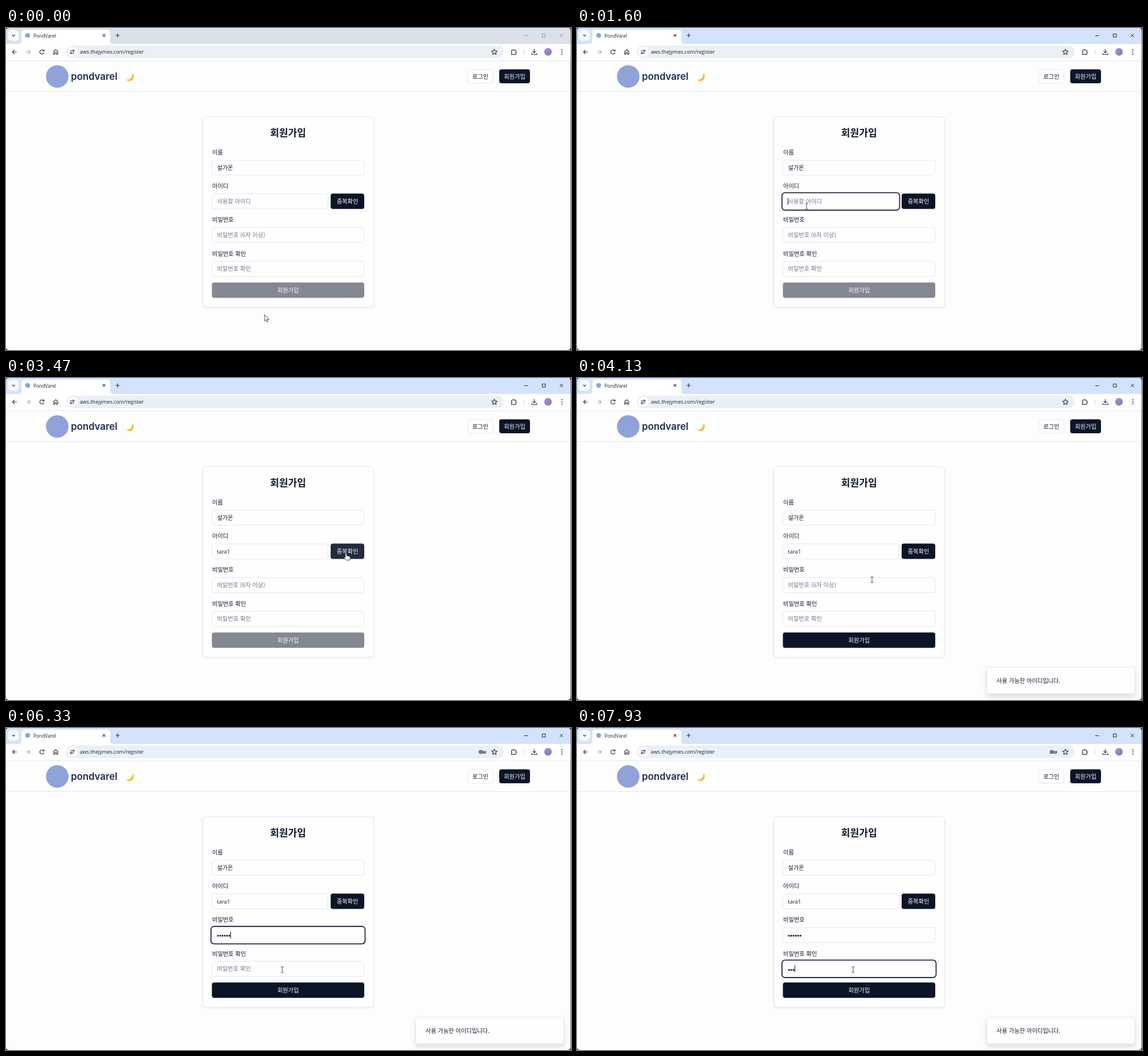
Write an HTML page that moves like this. It is 992 by 565 pixels and loops after 8000 ms.

```html
<!DOCTYPE html>
<html lang="ko">
<head>
<meta charset="utf-8">
<title>Sign-up form</title>
<style>
  html, body { margin: 0; width: 100%; height: 100%; overflow: hidden; background: #fdfdfe; }
  svg { display: block; width: 992px; height: 565px; }
  text { font: 10.25px "Noto Sans CJK KR", "Noto Sans CJK", sans-serif; fill: #0f172a; white-space: pre; }
  .ui { font-family: "Open Sans", sans-serif; fill: #1f2328; }
  .title { font-size: 17.1px; font-weight: 700; }
  .brand { font: 600 16.8px Inter, sans-serif; fill: #1d2a4c; }
  .mid { text-anchor: middle; }
  .hint { fill: #6f7788; }
  .light { fill: #f8fafc; }
  .latin { font: 9.5px "Open Sans", sans-serif; }
  .dots { font: 11.4px "Liberation Sans", Arial, sans-serif; }
  .box { fill: #fefeff; stroke: #e2e6f0; }
  .dark { fill: #0c1527; }
  .ring { fill: none; stroke: #0c1527; stroke-width: 1.6; }
  .icon { fill: none; stroke: #33373d; stroke-width: 1.2; }
  .caret { stroke: #0f172a; stroke-width: 1; }
</style>
</head>
<body>
<svg viewBox="0 0 992 565">
  <defs>
    <linearGradient id="face" x2="1" y2="1">
      <stop stop-color="#a99ad0"/><stop offset="1" stop-color="#8a6db4"/>
    </linearGradient>
    <filter id="soft" x="-10%" y="-10%" width="120%" height="130%">
      <feDropShadow dx="0" dy="1" stdDeviation="1" flood-color="#0f172a" flood-opacity=".1"/>
    </filter>
    <filter id="lift" x="-10%" y="-30%" width="120%" height="190%">
      <feDropShadow dx="0" dy="5" stdDeviation="4" flood-color="#0f172a" flood-opacity=".13"/>
    </filter>
    <clipPath id="frame"><rect width="991.2" height="565" rx="5"/></clipPath>
  </defs>
  <rect width="992" height="565" fill="#3a3e45"/>

  <g clip-path="url(#frame)">
    <rect width="992" height="565" fill="#fdfdfe"/>

    <!-- Browser tabs and toolbar -->
    <rect id="bar" width="992" height="40"/>
    <rect x="3.5" y="3.5" width="19" height="19" rx="6" fill="#fff" opacity=".8"/>
    <path class="icon" d="M11 12l2.3 2.3 2.3-2.3"/>
    <path d="M22 28q5 0 5-5V9q0-6 6-6h144q6 0 6 6v14q0 5 5 5z" fill="#fff"/>
    <rect y="28" width="992" height="29" fill="#fff"/>
    <circle cx="38" cy="13" r="4.3" fill="#8fa3d8"/>
    <text class="ui" x="48" y="16.5" style="font-size:8.4px">PondVarel</text>
    <path class="icon" d="M169.7 10.7l4.6 4.6m0-4.6l-4.6 4.6M192.5 13h7m-3.500-3.500v7"/>
    <path id="controls" fill="none" d="M910 13.500h6.500M941.500 10.500h5.500v5.500h-5.500zM972.300 10.300l5.800 5.800m0-5.800l-5.800 5.800"/>

    <rect x="105" y="30.500" width="769" height="22.500" rx="11.250" fill="#ebf0f7"/>
    <circle cx="116.500" cy="41.800" r="8.800" fill="#fff"/>
    <g class="icon">
      <path d="M19 42h-7.500m3.500-3.500L11.500 42l3.500 3.500"/>
      <path d="M35 42h7.500m-3.500-3.500l3.500 3.500-3.500 3.500" stroke="#a9adb3"/>
      <path d="M66 39.700a3.700 3.700 0 1 0 .7 3.200M66.800 37.800v2.700h-2.700"/>
      <path d="M83.700 41.200l3.600-3.200 3.600 3.200v4.700h-2.300v-2.900h-2.600v2.900h-2.300z"/>
      <path d="M112.500 39.800h3.300m3.700 4h-3.300"/>
      <circle cx="118.300" cy="39.800" r="1.300"/><circle cx="114" cy="43.800" r="1.300"/>
      <path d="M857.500 37.300l1.400 3 3.300.4-2.400 2.200.6 3.300-2.900-1.600-2.900 1.600.6-3.300-2.400-2.200 3.300-.4z"/>
      <path d="M887.500 39h2.400a1.300 1.300 0 0 1 2.600 0h2.400v2.400a1.300 1.300 0 0 1 0 2.600v2.400h-7.400v-2.600a1.200 1.200 0 0 0 0-2.200z"/>
      <path d="M909.500 37v10" stroke="#d3dcea"/>
      <path d="M927.500 37v6.500m-3-2.800l3 3 3-3m-7.500 3v2.800h9v-2.800"/>
      <g id="key">
        <circle cx="833.500" cy="42" r="2.700"/><circle cx="833.500" cy="42" r=".6"/>
        <path d="M836 41h6v2.200h-1.200v1.300h-2.200v-1.300H836"/>
      </g>
    </g>
    <text class="ui" x="129.500" y="45" style="font-size:9px">aws.thejymes.com/register</text>
    <circle cx="951.500" cy="41.800" r="6.700" fill="url(#face)"/>
    <g fill="#33373d">
      <circle cx="976" cy="38" r="1.050"/><circle cx="976" cy="41.800" r="1.050"/><circle cx="976" cy="45.600" r="1.050"/>
    </g>
    <path d="M0 57.500h992" stroke="#e1e6ef"/>

    <!-- Page header -->
    <path d="M0 111.500h992" stroke="#e2e7f0"/>
    <circle cx="90" cy="85" r="19.800" fill="#8fa3d8"/>
    <text class="brand" x="114" y="90.500">pondvarel</text>
    <path d="M221.500 79a8 8 0 1 1-11.300 11.200c6 2.200 12.800-3.500 11.300-11.200z" fill="#f5bd45"/>
    <rect class="box" x="810.500" y="73" width="44.500" height="24" rx="4"/>
    <text class="mid" x="832.800" y="88.700">로그인</text>
    <rect class="dark" x="866" y="72.500" width="54" height="24.500" rx="4"/>
    <text class="mid light" x="893" y="88.700">회원가입</text>

    <!-- Form -->
    <rect class="box" x="345.500" y="155.500" width="300" height="334.500" rx="6" filter="url(#soft)"/>
    <text class="mid title" x="495.300" y="189.700">회원가입</text>
    <text x="362" y="221.800">이름</text>
    <text x="362" y="281">아이디</text>
    <text x="362" y="340.300">비밀번호</text>
    <text x="362" y="399.500">비밀번호 확인</text>
    <rect class="box" x="361.500" y="232" width="267.500" height="26" rx="4"/>
    <text x="370.500" y="248.800">설가온</text>
    <g id="fields"></g>
    <rect id="check" class="dark" x="570" y="290.500" width="59" height="27" rx="4"/>
    <text class="mid light" x="599.500" y="308">중복확인</text>
    <rect id="submit" class="dark" x="361.500" y="446.500" width="267.500" height="27" rx="4"/>
    <text class="mid light" x="495.300" y="464.300">회원가입</text>

    <g id="toast">
      <rect class="box" x="719.500" y="507.500" width="260" height="46.500" rx="4" filter="url(#lift)"/>
      <text x="736.500" y="534.800">사용 가능한 아이디입니다.</text>
    </g>
  </g>

  <g id="pointer">
    <path id="arrow" d="M0 0v11.300l2.600-2.400 1.800 4 1.700-.8-1.800-3.800h3.600z" fill="#fff" stroke="#222" stroke-width=".8"/>
    <path id="beam" d="M-2.500-5h2l.5.500.5-.5h2M0-4.500v9M-2.500 5h2l.5-.5.5.5h2" fill="none" stroke="#333" stroke-width=".9"/>
    <path id="hand" d="M-1.200 1q1.200-1.800 2.400 0v4l5 1q1.300.4 1.200 1.800l-.8 4.700H.300L-3.800 8q.2-1.500 2.600.2z" fill="#fff" stroke="#222" stroke-width=".8"/>
  </g>
</svg>
<script>
const LOOP = 8000, BLINK = 530;
const $ = id => document.getElementById(id);
const show = (el, on) => el.setAttribute("visibility", on ? "visible" : "hidden");
const ease = u => u * u * (3 - 2 * u);

// Text fields: centre line, width, hint, typed value and key times in ms
const fields = [
  { y: 304.2, w: 203.5, hint: "사용할 아이디", value: "tara1", font: "latin",
    keys: [1865, 1930, 1995, 2125, 2595] },
  { y: 363.3, w: 267.5, hint: "비밀번호 (6자 이상)", value: "••••••", font: "dots",
    keys: [4660, 4930, 5195, 5460, 5660, 5860] },
  { y: 422.5, w: 267.5, hint: "비밀번호 확인", value: "••••••", font: "dots",
    keys: [7595, 7730, 7860] }
];
// Focus changes: time, field index (-1 for none)
const focus = [[0, -1], [390, 0], [3400, -1], [4265, 1], [6395, 2]];
const ACTIVE = 390, REPLY = 3530, SLIDE = 150;
// Pointer stops: time, x, y
const path = [
  [70, 454, 503], [330, 403, 313], [3060, 403, 313], [3330, 597, 307], [3870, 597, 307],
  [4120, 518, 354], [4470, 518, 354], [4730, 514, 355], [5900, 514, 355], [6240, 485, 424]
];

$("fields").innerHTML = fields.map(f => `<g>
  <rect class="box" x="361.5" y="${f.y - 13.2}" width="${f.w}" height="26.500" rx="4"/>
  <rect class="ring" x="359.800" y="${f.y - 15.2}" width="${f.w + 3.2}" height="30.600" rx="5.500"/>
  <text class="hint" x="370.500" y="${f.y + 3.8}">${f.hint}</text>
  <text class="${f.font}" x="370.300" y="${f.y + (f.font === "dots" ? 5 : 4)}"></text>
  <path class="caret" d="M.500 ${f.y - 6}v12"/></g>`).join("");
fields.forEach((f, i) => {
  [, f.ring, f.hintText, f.text, f.caret] = $("fields").children[i].children;
});

function pointerAt(t) {
  const i = path.findIndex(p => p[0] > t);
  if (i < 1) return path.at(i).slice(1).map((v, k) => i ? path.at(-1)[k + 1] : v);
  const [a, b] = [path[i - 1], path[i]];
  const u = ease((t - a[0]) / (b[0] - a[0]));
  return [a[1] + (b[1] - a[1]) * u, a[2] + (b[2] - a[2]) * u];
}

function drawField(f, t, focusTime) {
  const typed = f.keys.filter(k => k <= t);
  const focused = focusTime !== null;
  f.text.textContent = f.value.slice(0, typed.length);
  show(f.hintText, !typed.length);
  show(f.ring, focused);
  const since = focused ? t - Math.max(focusTime, typed.at(-1) ?? 0) : 0;
  show(f.caret, focused && since % (2 * BLINK) < BLINK);
  const end = typed.length ? f.text.getComputedTextLength() : 0;
  f.caret.setAttribute("transform", `translate(${Math.round(370 + end)})`);
}

function drawPointer(t) {
  const [x, y] = pointerAt(t);
  const inside = (l, top, w, h) => x >= l && x <= l + w && y >= top && y <= top + h;
  const onCheck = inside(570, 290.5, 59, 27);
  const onField = inside(361, 232, 268, 26) || fields.some(f => inside(361, f.y - 13.5, f.w, 27));
  $("pointer").setAttribute("transform", `translate(${x.toFixed(1)} ${y.toFixed(1)})`);
  show($("hand"), onCheck);
  show($("beam"), onField);
  show($("arrow"), !onCheck && !onField);
  $("check").setAttribute("opacity", onCheck ? .9 : 1);
}

function render(t) {
  const active = t >= ACTIVE;
  $("bar").setAttribute("fill", active ? "#d3e3fd" : "#dae1e8");
  $("controls").setAttribute("stroke", active ? "#24282e" : "#92989f");

  const [since, current] = focus.findLast(([start]) => start <= t);
  fields.forEach((f, i) => drawField(f, t, i === current ? since : null));
  show($("key"), t >= fields[1].keys[0]);

  $("submit").setAttribute("opacity", t >= REPLY ? 1 : .5);
  const slide = Math.min(1, Math.max(0, (t - REPLY) / SLIDE));
  show($("toast"), t >= REPLY);
  $("toast").setAttribute("transform", `translate(0 ${(58 * (1 - ease(slide))).toFixed(1)})`);
  drawPointer(t);
}

const start = performance.now();
function tick() {
  render((performance.now() - start) % LOOP);
  requestAnimationFrame(tick);
}
tick();
</script>
</body>
</html>
```
